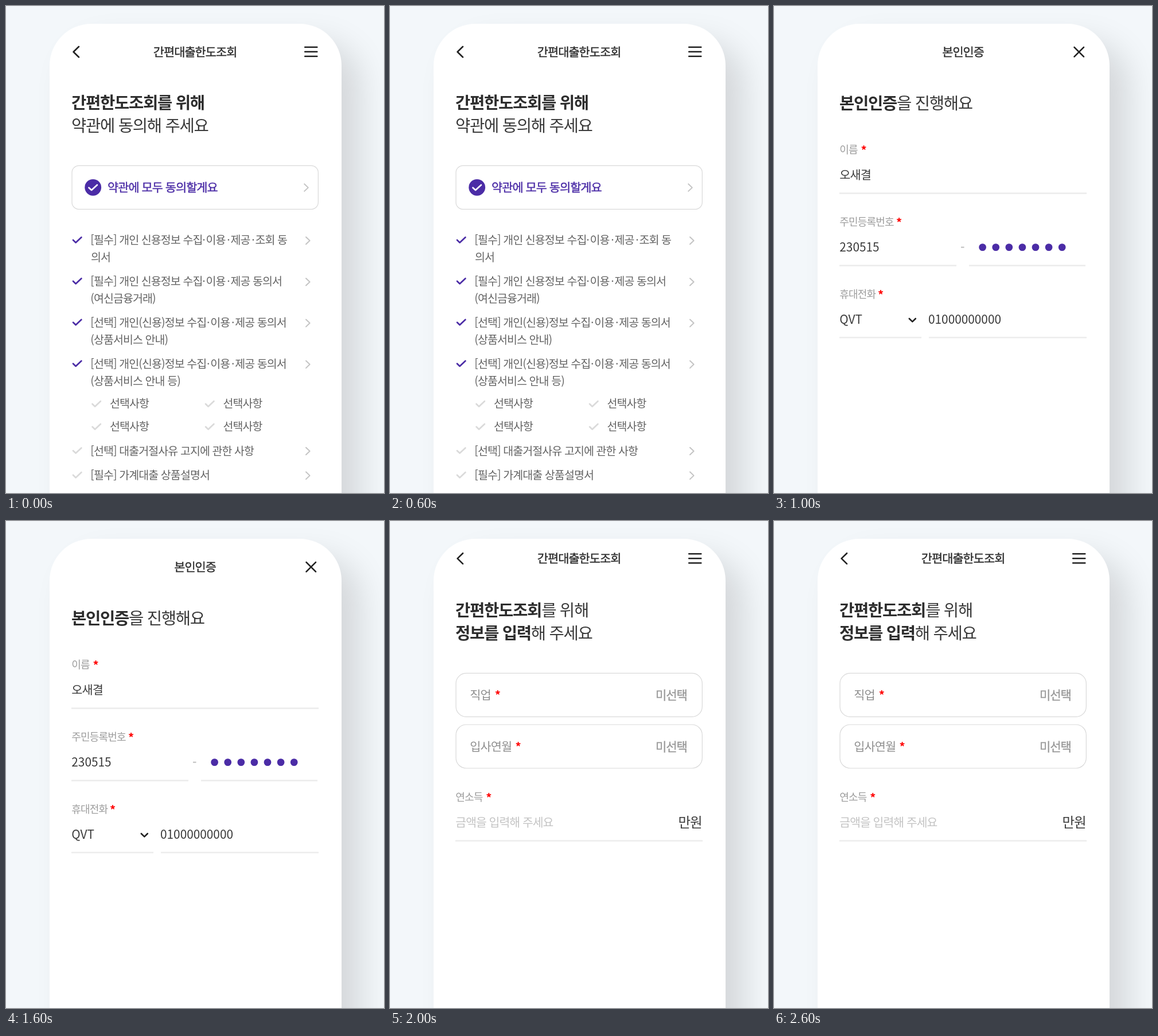
Recreate the animation shown at these times as an HTML page. Size 659 px wide and 849 px high, loop 3 s.

```html
<!DOCTYPE html>
<html lang="ko">
<head>
<meta charset="utf-8">
<title>간편대출한도조회</title>
<style>
html, body { margin: 0; width: 100%; height: 100%; overflow: hidden; background: #f3f7fa; }
.stage { position: relative; width: 100%; height: 100%; overflow: hidden; contain: strict; }
.phone {
  position: absolute; left: 75.5px; top: 31px; width: 509.5px; height: 1000px;
  border-radius: 73px 73px 0 0; background: #fff;
  box-shadow: 32px 32px 56px rgba(0, 0, 0, .13);
}
svg { position: absolute; left: 0; top: 0; }
text {
  font: 20.8px "Noto Sans CJK KR", "Noto Sans CJK", sans-serif;
  letter-spacing: -.045em; fill: #3a3a3a;
}
.title { text-anchor: middle; fill: #2e2e2e; color: #2e2e2e; }
.head { font-size: 28.6px; }
.bold { font-weight: 700; fill: #2e2e2e; }
.semi { stroke: currentColor; stroke-width: .4px; }
.all { fill: #4b2ca6; color: #4b2ca6; }
.row text { font-size: 19.45px; fill: #636363; }
.mid { text-anchor: middle; }
.num { letter-spacing: 0; }
.label { font-size: 18px; fill: #9c9c9c; }
.field { fill: #8f8f8f; }
.pick { font-size: 21px; fill: #999; color: #999; text-anchor: end; }
.hint { font-size: 20.4px; fill: #c3c3c3; }
.unit { font-size: 23.5px; text-anchor: end; }
.star { font-size: 20px; font-weight: 700; letter-spacing: 0; fill: #f00; text-anchor: middle; }
.line, .tick, .go { fill: none; stroke-linecap: round; stroke-linejoin: round; }
.line { stroke: #222; stroke-width: 2.6; }
.tick { stroke-width: 2.7; }
.on { stroke: #4b2ca6; }
.off { stroke: #dadada; }
.go { stroke: #c4c4c4; stroke-width: 2; }
.box { fill: #fff; stroke: #d9d9d9; stroke-width: 1.2; }
.rule { fill: none; stroke: #ececec; stroke-width: 2.5; }
.screen { animation: turn 3s step-end infinite; }
.second { animation-delay: -2s; }
.third { animation-delay: -1s; }
@keyframes turn {
  0% { visibility: visible; }
  33.3333%, 100% { visibility: hidden; }
}
</style>
</head>
<body>
<div class="stage">
<div class="phone"></div>
<svg width="659" height="849" viewBox="0 0 659 849">
  <defs>
    <path id="tick" d="M-7 0.2L-2.4 4.6L7.4-4.6"/>
    <path id="go" d="M-3.3-6.3L3.3 0L-3.3 6.3"/>
    <g id="bar">
      <path class="line" d="M127 70.8L117.6 80L127 89.2M521.2 71.8H542.3M521.2 79.8H542.3M521.2 87.8H542.3"/>
      <text class="title semi" x="329.6" y="87.7">간편대출한도조회</text>
    </g>
  </defs>

  <g class="screen">
    <use href="#bar"/>
    <text class="head bold" x="114" y="179">간편한도조회를 위해</text>
    <text class="head" x="114" y="218.8">약관에 동의해 주세요</text>

    <rect class="box" x="115" y="278.3" width="429.3" height="76" rx="12"/>
    <circle cx="151.7" cy="316.3" r="14.4" fill="#4b2ca6"/>
    <use class="tick" href="#tick" x="151.5" y="316.5" stroke="#fff"/>
    <text class="all semi" x="177" y="323.9">약관에 모두 동의할게요</text>
    <use class="go" href="#go" x="523.5" y="316.6"/>

    <g class="row">
      <text x="147.3" y="415.1">[필수] 개인 신용정보 수집<tspan class="mid" x="344.5">·</tspan><tspan x="348.5">이용</tspan><tspan class="mid" x="387.5">·</tspan><tspan x="391.5">제공</tspan><tspan class="mid" x="430.5">·</tspan><tspan x="434.5">조회 동</tspan></text>
      <text x="148" y="444.6">의서</text>
      <text x="147.3" y="487.1">[필수] 개인 신용정보 수집<tspan class="mid" x="344.5">·</tspan><tspan x="348.5">이용</tspan><tspan class="mid" x="387.5">·</tspan><tspan x="391.5">제공 동의서</tspan></text>
      <text x="147.3" y="516.6">(여신금융거래)</text>
      <text x="147.3" y="559.1">[선택] 개인(신용)정보 수집<tspan class="mid" x="352.2">·</tspan><tspan x="356.2">이용</tspan><tspan class="mid" x="395.2">·</tspan><tspan x="399.2">제공 동의서</tspan></text>
      <text x="147.3" y="588.6">(상품서비스 안내)</text>
      <text x="147.3" y="631.1">[선택] 개인(신용)정보 수집<tspan class="mid" x="352.2">·</tspan><tspan x="356.2">이용</tspan><tspan class="mid" x="395.2">·</tspan><tspan x="399.2">제공 동의서</tspan></text>
      <text x="147.3" y="660.6">(상품서비스 안내 등)</text>
      <text x="181" y="700.3">선택사항<tspan x="378.5">선택사항</tspan></text>
      <text x="181" y="740.3">선택사항<tspan x="378.5">선택사항</tspan></text>
      <text x="147.3" y="782.6">[선택] 대출거절사유 고지에 관한 사항</text>
      <text x="147.3" y="825.1">[필수] 가계대출 상품설명서</text>
    </g>
    <g class="tick on">
      <use href="#tick" x="124" y="407.8"/>
      <use href="#tick" x="124" y="479.6"/>
      <use href="#tick" x="124" y="551.4"/>
      <use href="#tick" x="124" y="623.3"/>
    </g>
    <g class="tick off">
      <use href="#tick" x="157.5" y="693.6"/>
      <use href="#tick" x="355" y="693.6"/>
      <use href="#tick" x="157.5" y="733.4"/>
      <use href="#tick" x="355" y="733.4"/>
      <use href="#tick" x="124" y="775"/>
      <use href="#tick" x="124" y="817.6"/>
    </g>
    <g class="go">
      <use href="#go" x="526.3" y="409"/>
      <use href="#go" x="526.3" y="481"/>
      <use href="#go" x="526.3" y="552.8"/>
      <use href="#go" x="526.3" y="624.8"/>
      <use href="#go" x="526.3" y="776"/>
      <use href="#go" x="526.3" y="818.6"/>
    </g>
  </g>

  <g class="screen second">
    <text class="title semi" x="329.6" y="87.7">본인인증</text>
    <path class="line" d="M523.5 71.8L540 88.3M540 71.8L523.5 88.3"/>
    <text class="head" x="114" y="180"><tspan class="bold">본인인증</tspan>을 진행해요</text>

    <text class="label" x="114.3" y="256.8">이름</text>
    <text class="star" x="156.5" y="259">*</text>
    <text x="114.3" y="301.9">오새결</text>

    <text class="label" x="114.3" y="382.8">주민등록번호</text>
    <text class="star" x="218" y="385">*</text>
    <text class="num" x="114.3" y="428.4">230515</text>
    <path d="M326 420.6H331.5" stroke="#bdbdbd" stroke-width="2"/>
    <path d="M363.6 420.6H503" fill="none" stroke="#4b2ca6" stroke-width="12.8" stroke-linecap="round" stroke-dasharray="0 23.1"/>

    <text class="label" x="114.3" y="508.8">휴대전화</text>
    <text class="star" x="186" y="511">*</text>
    <text class="num" x="114.3" y="554.4">QVT</text>
    <path class="line" d="M235.8 545L241.3 550.4L246.8 545"/>
    <text class="num" x="269" y="554.4">01000000000</text>

    <path class="rule" d="M114 326.5H545M114 452.5H318M340 452.5H543M114 578H257M270 578H545"/>
  </g>

  <g class="screen third">
    <use href="#bar" y="-14.6"/>
    <text class="head" x="114" y="165.8"><tspan class="bold">간편한도조회</tspan>를 위해</text>
    <text class="head" x="114" y="205.8"><tspan class="bold">정보를 입력</tspan>해 주세요</text>

    <rect class="box" x="115" y="265.4" width="429.3" height="76" rx="18"/>
    <text class="field" x="139.3" y="310.9">직업</text>
    <text class="star" x="187.7" y="311">*</text>
    <text class="pick semi" x="518" y="310.9">미선택</text>

    <rect class="box" x="115" y="355" width="429.3" height="76" rx="18"/>
    <text class="field" x="139.3" y="400.7">입사연월</text>
    <text class="star" x="223.5" y="400.8">*</text>
    <text class="pick semi" x="518" y="400.7">미선택</text>

    <text class="label" x="114.3" y="487.8">연소득</text>
    <text class="star" x="172.3" y="490">*</text>
    <text class="hint" x="114.3" y="533.4">금액을 입력해 주세요</text>
    <text class="unit" x="543.5" y="533.7">만원</text>
    <path class="rule" d="M114 557.5H545"/>
  </g>
</svg>
</div>
</body>
</html>
```
